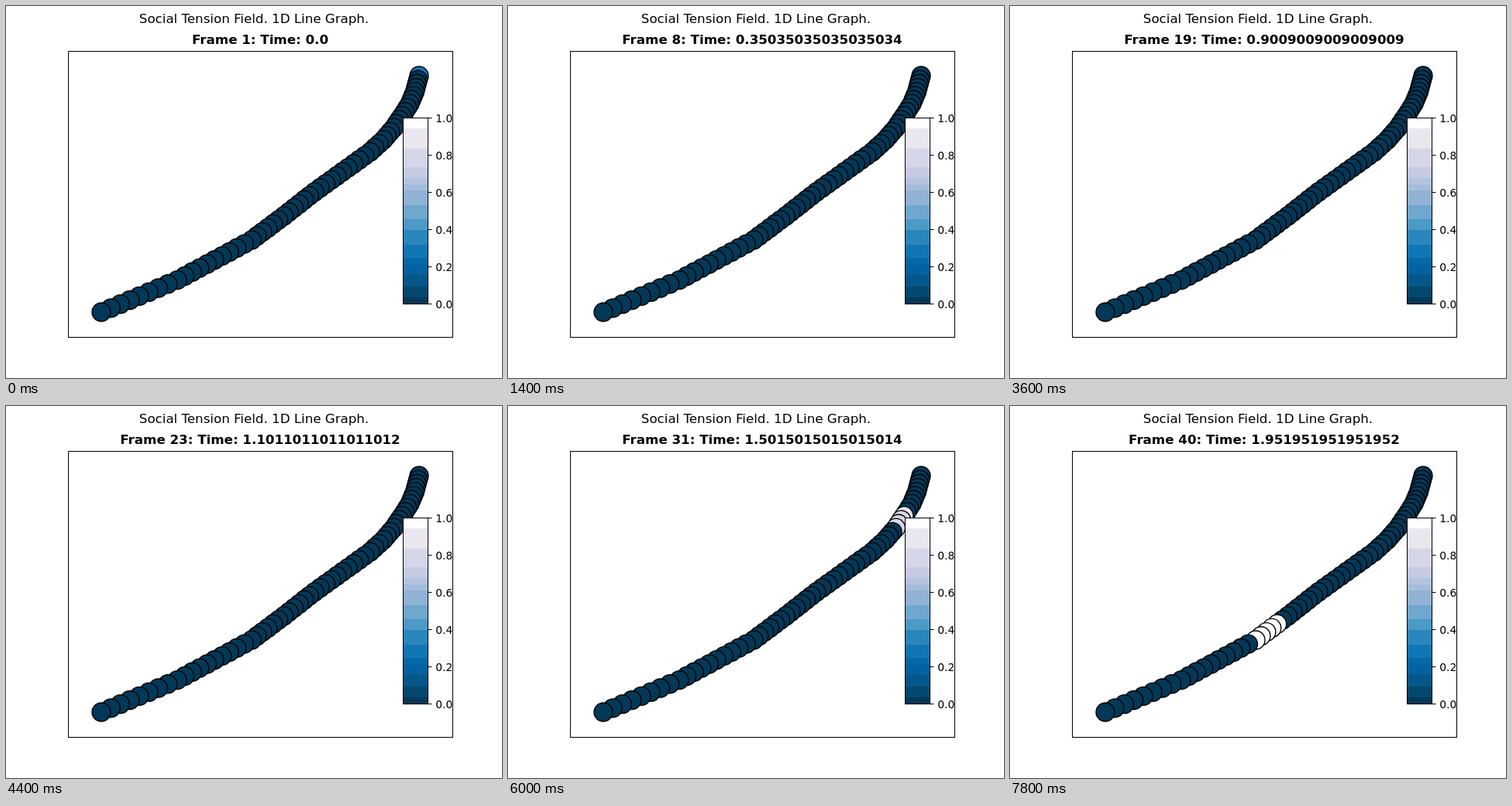
Animation, 640 px wide and 480 px high, one loop 8000 ms. Source, as an HTML page:

```html
<!DOCTYPE html>
<html lang="en">
<head>
<meta charset="utf-8">
<title>Social Tension Field</title>
<style>
  html, body { margin: 0; width: 100%; height: 100%; overflow: hidden; background: #fff; }
  svg { display: block; width: 640px; height: 480px; }
  text { font-family: "DejaVu Sans", sans-serif; font-size: 16.667px; text-anchor: middle; }
  #title { font-weight: bold; }
  #bar text { font-size: 13.889px; text-anchor: start; }
  #nodes { stroke: #000; stroke-width: 1.389; }
</style>
</head>
<body>
<svg viewBox="0 0 640 480">
  <rect x="80.5" y="58.5" width="496" height="369" fill="none" stroke="#000"/>
  <g id="nodes"></g>
  <g id="bar"></g>
  <text x="320" y="22">Social Tension Field. 1D Line Graph.</text>
  <text id="title" x="328" y="49"></text>
</svg>
<script>
const STEP_MS = 200, STEPS = 40, NODES = 60;
const BAR = { x: 512, top: 144, bottom: 384, width: 32 };

// Colour bands from low to high: [upper edge on the bar, colour]
const BANDS = [
  [376, '#023858'], [362, '#03486f'], [347, '#045788'], [334, '#0462a0'],
  [325, '#0569a7'], [308, '#1076b4'], [289, '#2a87bc'], [275, '#4c99c6'],
  [257, '#70a7cf'], [238, '#90b2d5'], [230, '#a5bcda'], [222, '#b3c3df'],
  [208, '#c4cbe2'], [184, '#d6d6e9'], [158, '#eae6ef'], [144, '#ffffff']
];

// The curve: [node index from the lower left, x]; y rises evenly
const CURVE = [
  [0, 123], [8, 221], [18, 317], [24, 358.5], [30, 398], [32, 412.5], [40, 470],
  [43, 487], [46, 500.5], [50, 514.5], [52, 521], [55, 527.5], [59, 533]
];

function add(parent, tag, attrs) {
  const el = document.createElementNS('http://www.w3.org/2000/svg', tag);
  for (const key in attrs) el.setAttribute(key, attrs[key]);
  return parent.appendChild(el);
}

function curveX(k) {
  const i = Math.max(1, CURVE.findIndex(p => p[0] >= k));
  const [k0, x0] = CURVE[i - 1], [k1, x1] = CURVE[i];
  return x0 + (x1 - x0) * (k - k0) / (k1 - k0);
}

function colour(value) {
  const y = BAR.bottom - Math.min(1, value) * (BAR.bottom - BAR.top);
  return BANDS.find(([top]) => y >= top)[1];
}

// Tension at a node, counted from the top end, at a one-based step
function tension(node, step) {
  if (step === 1) return node === 0 ? 0.27 : 0;
  if (step < 24) return 0;
  const m = step - 31;
  const front = Math.max(0, Math.round(13 + 2.778 * m + 0.037 * m * m));
  const behind = front - node;
  const width = step < 34 ? 4 : 5;
  return behind >= 0 && behind < width ? (step - 23) / 10 + 0.015 * behind : 0;
}

const nodes = Array.from({ length: NODES }, (_, i) => {
  const k = NODES - 1 - i;
  return add(document.getElementById('nodes'), 'circle',
    { cx: curveX(k), cy: 395 - 5.17 * k, r: 12 });
});

const bar = document.getElementById('bar');
let lower = BAR.bottom;
for (const [top, fill] of BANDS) {
  add(bar, 'rect', { x: BAR.x, y: top, width: BAR.width, height: lower - top, fill });
  lower = top;
}
add(bar, 'rect', { x: 512.5, y: 144.5, width: 32, height: 240, fill: 'none', stroke: '#000' });
for (let i = 0; i <= 5; i++) {
  const y = BAR.bottom - 48 * i;
  add(bar, 'path', { d: `M544.5 ${y + 0.5}h5`, stroke: '#000' });
  add(bar, 'text', { x: 554.3, y: y + 5.5 }).textContent = (i / 5).toFixed(1);
}

const title = document.getElementById('title');
let shown = -1;

function draw(index) {
  const time = 5 * index * (10 / 999);
  title.textContent = `Frame ${index + 1}: Time: ${index ? time : '0.0'}`;
  nodes.forEach((node, i) => node.setAttribute('fill', colour(tension(i, index + 1))));
}

const start = performance.now();
function tick() {
  const index = Math.floor((performance.now() - start) / STEP_MS) % STEPS;
  if (index !== shown) draw(shown = index);
  requestAnimationFrame(tick);
}
tick();
</script>
</body>
</html>
```
